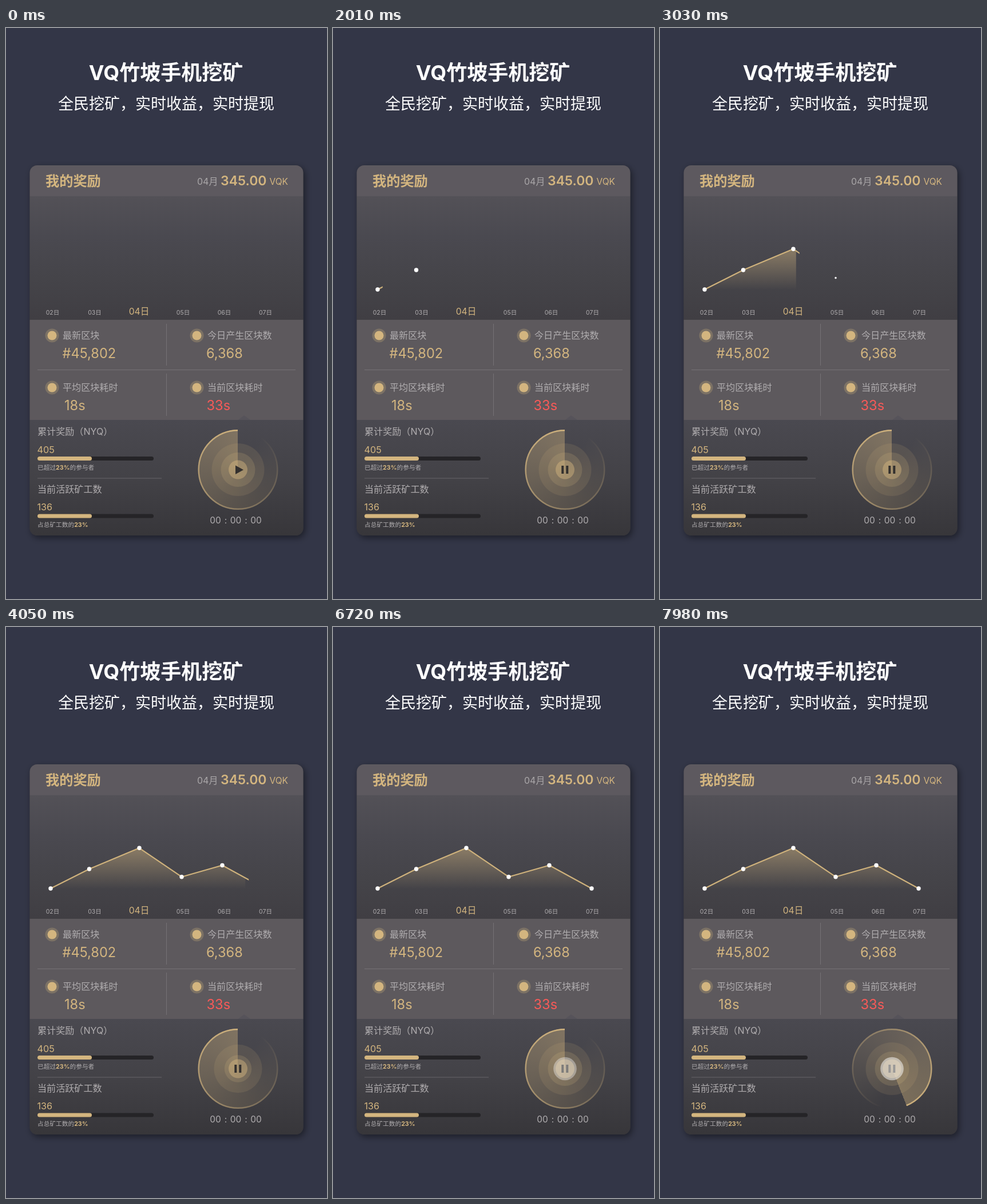
Animation of 561x998 px, one loop 8000 ms. Source, as an HTML page with a canvas:

```html
<!DOCTYPE html>
<html lang="zh-CN">
<head>
<meta charset="utf-8">
<title>手机挖矿</title>
<style>
html, body { margin: 0; width: 100%; height: 100%; overflow: hidden; background: #333647; }
canvas { display: block; width: 561px; height: 998px; }
</style>
</head>
<body>
<canvas id="stage" width="561" height="998"></canvas>
<script>
const ctx = document.getElementById('stage').getContext('2d');
const LOOP = 8000;
const FONT = 'Inter, "Noto Sans CJK SC", "Noto Sans CJK", sans-serif';
const GOLD = '#d3b57f', GREY = '#b0adaf', WHITE = '#ffffff';
const DIAL = { x: 405.5, y: 772, r: 70 };
const POINTS = [[78, 457], [145.5, 423], [233, 386.3], [307, 436.7], [378, 416.5], [452, 457]];

const clamp = v => Math.max(0, Math.min(1, v));
const ramp = (t, from, to) => clamp((t - from) / (to - from));
const smooth = p => p * p * (3 - 2 * p);
const mix = (a, b, p) => a + (b - a) * p;
const gold = alpha => `rgba(211,181,127,${alpha})`;

function text(str, x, cy, size, color, weight = 400, align = 'left') {
  ctx.font = `${weight} ${size}px ${FONT}`;
  ctx.textAlign = align;
  ctx.fillStyle = color;
  ctx.fillText(str, x, cy + size * 0.37);
  return x + ctx.measureText(str).width;
}

function disc(x, y, r, color) {
  if (r <= 0) return;
  ctx.fillStyle = color;
  ctx.beginPath();
  ctx.arc(x, y, r, 0, Math.PI * 2);
  ctx.fill();
}

function pill(x, y, w, h, r, color) {
  ctx.fillStyle = color;
  ctx.beginPath();
  ctx.roundRect(x, y, w, h, r);
  ctx.fill();
}

function rect(x, y, w, h, color) {
  ctx.fillStyle = color;
  ctx.fillRect(x, y, w, h);
}

function vertical(y0, y1, stops) {
  const g = ctx.createLinearGradient(0, y0, 0, y1);
  stops.forEach((c, i) => g.addColorStop(i / (stops.length - 1), c));
  return g;
}

function drawCard() {
  rect(0, 0, 561, 998, '#333647');
  ctx.save();
  ctx.shadowColor = 'rgba(0,0,0,0.45)';
  ctx.shadowBlur = 12;
  ctx.shadowOffsetX = 3;
  ctx.shadowOffsetY = 4;
  pill(41.5, 240, 478, 647, 13, '#3b3a3e');
  ctx.restore();

  ctx.save();
  ctx.beginPath();
  ctx.roundRect(41.5, 240, 478, 647, 13);
  ctx.clip();
  rect(41, 240, 479, 54, '#5d595f');
  rect(41, 294, 479, 216, vertical(294, 510, ['#535157', '#4a4950', '#454449', '#403e43']));
  rect(41, 510, 479, 175, '#5d595d');
  rect(41, 685, 479, 202, vertical(685, 887, ['#4a4950', '#434247', '#37363a']));
  ctx.fillStyle = '#56535a';
  ctx.beginPath();
  ctx.moveTo(406, 685);
  ctx.lineTo(416, 677);
  ctx.lineTo(427, 685);
  ctx.fill();
  ctx.restore();

  rect(280, 517, 1, 73, '#757176');
  rect(280, 604, 1, 74, '#757176');
  rect(55, 597, 451, 1, '#757176');
  rect(55, 786.5, 217, 1, '#68656a');
}

function drawStat(x, y, label, value, valueX, color) {
  disc(x, y, 12, gold(0.27));
  disc(x, y, 8, GOLD);
  text(label, x + 18.5, y, 16.1, GREY);
  text(value, valueX, y + 30.5, 23.6, color);
}

function drawProgress(y, label, value, parts) {
  text(label, 55, y, 16.1, GREY);
  text(value, 54.5, y + 31.5, 16.2, GOLD);
  pill(55, y + 43.5, 203, 7, 3.5, '#252427');
  pill(55, y + 43.5, 95, 7, 3.5, GOLD);
  let x = 55;
  parts.forEach(part => {
    const key = part.endsWith('%');
    x = text(part, x, y + 62.5, 10.7, key ? GOLD : GREY, key ? 700 : 400);
  });
}

function drawLabels() {
  text('VQ竹坡手机挖矿', 279.5, 77.5, 36, WHITE, 700, 'center');
  text('全民挖矿，实时收益，实时提现', 91, 132.5, 27, WHITE);
  text('我的奖励', 69, 267.5, 24.2, GOLD, 600);
  text('04月', 334, 268.5, 16, '#aaa7a9');
  text('345.00', 375, 266.5, 23, GOLD, 600);
  text('VQK', 493, 268.5, 15.5, GOLD, 400, 'right');

  [81.5, 155, 232.5, 309.5, 381.5, 453.5].forEach((x, i) => {
    const today = i === 2;
    text(`0${i + 2}日`, x, today ? 495.5 : 497.5, today ? 15.7 : 10.5, today ? GOLD : GREY, 400, 'center');
  });

  drawStat(80.5, 537.5, '最新区块', '#45,802', 98.5, GOLD);
  drawStat(333.5, 537.5, '今日产生区块数', '6,368', 350, GOLD);
  drawStat(80.5, 628.5, '平均区块耗时', '18s', 102, GOLD);
  drawStat(333.5, 628.5, '当前区块耗时', '33s', 350.5, '#f85a58');

  drawProgress(705.5, '累计奖励（NYQ）', '405', ['已超过', '23%', '的参与者']);
  drawProgress(806, '当前活跃矿工数', '136', ['占总矿工数的', '23%']);

  [366, 401.5, 437].forEach(x => text('00', x, 860.5, 15.5, GREY, 400, 'center'));
  [384, 419.5].forEach(x => text(':', x, 860.5, 15.5, GREY, 400, 'center'));
}

function trace() {
  ctx.beginPath();
  POINTS.forEach(([x, y]) => ctx.lineTo(x, y));
}

function clipTo(x, draw) {
  ctx.save();
  ctx.beginPath();
  ctx.rect(70, 370, Math.max(0, x - 70), 100);
  ctx.clip();
  draw();
  ctx.restore();
}

function drawChart(t) {
  const p = smooth(ramp(t, 1760, 4510));
  const tip = 78 + 374 * p;
  if (p > 0) {
    clipTo(tip - 6, () => {
      trace();
      ctx.lineTo(452, 458);
      ctx.lineTo(78, 458);
      ctx.closePath();
      ctx.fillStyle = vertical(386, 458, [gold(0.48), gold(0)]);
      ctx.fill();
    });
    clipTo(tip, () => {
      trace();
      ctx.strokeStyle = '#cfb27c';
      ctx.lineWidth = 2.2;
      ctx.lineJoin = 'round';
      ctx.stroke();
    });
  }
  POINTS.forEach(([x, y], i) => {
    const start = 1000 + i * 630;
    disc(x, y, 3.7 * ramp(t, start, start + 300), WHITE);
  });
}

function sweep(angle, alpha) {
  const g = ctx.createConicGradient(angle - Math.PI / 2, DIAL.x, DIAL.y);
  g.addColorStop(0, gold(0));
  g.addColorStop(0.1, gold(0));
  g.addColorStop(1, gold(alpha));
  return g;
}

// Radii of the two halos: at rest, pulled in, then spreading outward.
function halos(t) {
  if (t < 3030 || t >= 6570) return [46, 30];
  if (t < 3300) {
    const p = ramp(t, 3030, 3300);
    return [mix(46, 33.5, p), mix(30, 17, p)];
  }
  const s = (t - 3300) / 1000;
  return [33.5 + 11.5 * s, 17 + 9 * s];
}

function drawDial(t) {
  const { x, y, r } = DIAL;
  const angle = Math.max(0, t - 6780) * 0.132 * Math.PI / 180;

  disc(x, y, r, sweep(angle, 0.4));
  ctx.strokeStyle = sweep(angle, 0.95);
  ctx.lineWidth = 2.4;
  ctx.beginPath();
  ctx.arc(x, y, r - 1.2, 0, Math.PI * 2);
  ctx.stroke();

  const [outer, inner] = halos(t);
  disc(x, y, Math.min(outer, r), gold(0.12 * (1 - ramp(outer, 46, 72))));
  disc(x, y, inner, gold(0.18));
  disc(x, y, 16.5, gold(0.46));

  const ink = '#33302e';
  if (t < 1290) {
    ctx.fillStyle = ink;
    ctx.beginPath();
    ctx.moveTo(401, 764.5);
    ctx.lineTo(415, 772.3);
    ctx.lineTo(401, 780);
    ctx.fill();
  } else {
    rect(399.3, 765, 4, 14, ink);
    rect(407.3, 765, 4, 14, ink);
  }

  const touch = ramp(t, 900, 1080) * (1 - ramp(t, 1500, 1770)) + ramp(t, 6560, 6780);
  if (touch > 0) disc(x, y, 20.3, `rgba(255,255,255,${0.5 * touch})`);
}

function frame(now) {
  const t = now % LOOP;
  drawCard();
  drawLabels();
  drawChart(t);
  drawDial(t);
  requestAnimationFrame(frame);
}
frame(0);
</script>
</body>
</html>
```
